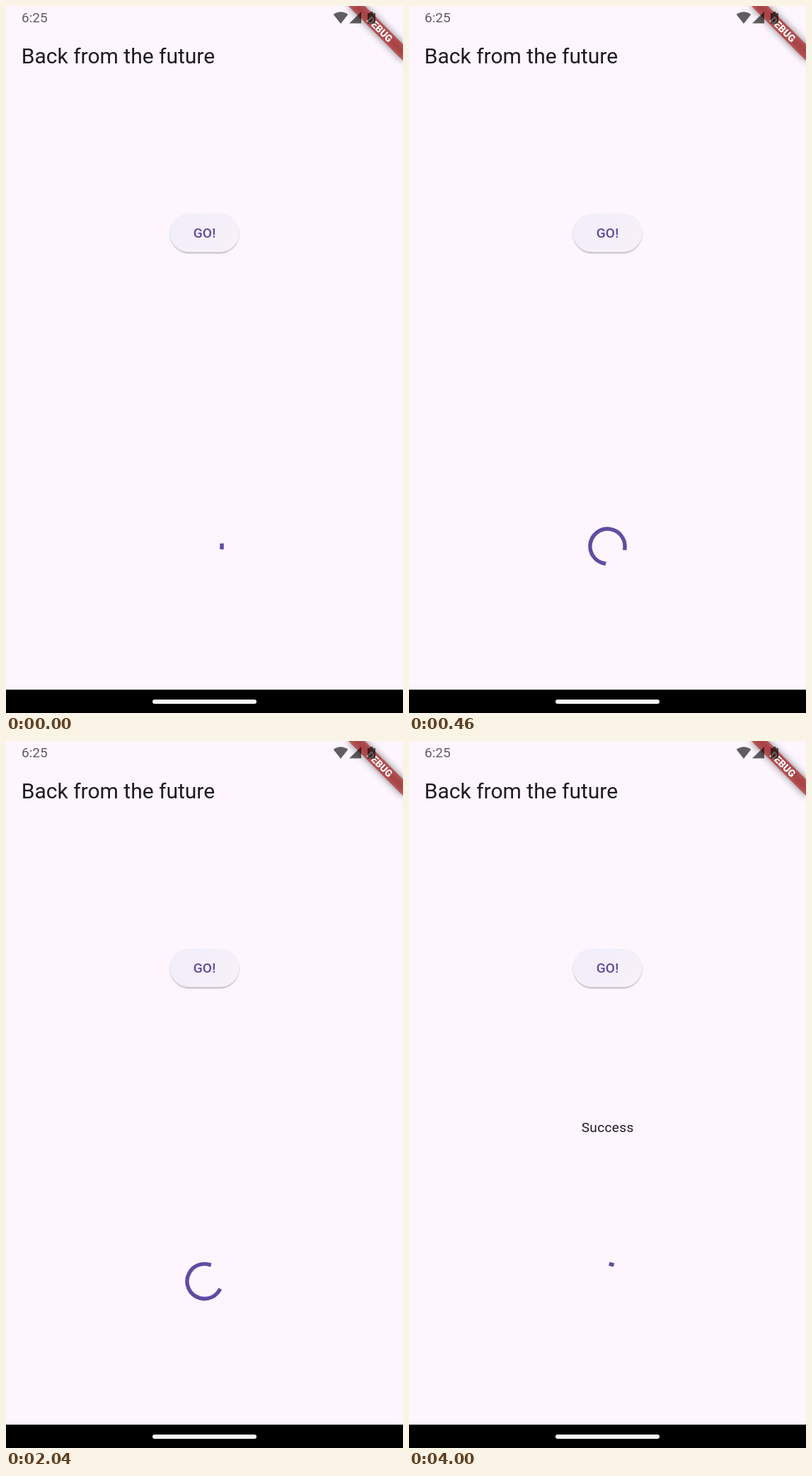
Animation, 561 px wide and 998 px high, one loop 4.04 s. Source, as an HTML page:

```html
<!DOCTYPE html>
<html lang="en">
<head>
<meta charset="utf-8">
<title>Back from the future</title>
<style>
  html, body { margin: 0; width: 100%; height: 100%; overflow: hidden; background: #fdf6fe; }
  svg { display: block; width: 561px; height: 998px; font-family: Roboto, sans-serif; }
  .soft { filter: blur(5.4px); }
  .edge { filter: blur(1px); }
</style>
</head>
<body>
<svg viewBox="0 0 561 998">
  <defs>
    <linearGradient id="face" x2="1" y2="0.4">
      <stop offset="0" stop-color="#f2eff9"/>
      <stop offset="0.4" stop-color="#f2effb"/>
      <stop offset="1" stop-color="#f7f0f7"/>
    </linearGradient>
    <radialGradient id="ripple" cx="0.42" r="0.6">
      <stop offset="0" stop-color="#e6e1fa"/>
      <stop offset="0.55" stop-color="#e8e5f6"/>
      <stop offset="1" stop-color="#ebe8eb"/>
    </radialGradient>
  </defs>

  <rect width="561" height="998" fill="#fdf6fe"/>
  <text x="21.8" y="80.5" font-size="30" fill="#1d1b20">Back from the future</text>

  <!-- Button -->
  <rect class="edge" x="232" y="295" width="97" height="54" rx="27" fill="#000" opacity="0.3"/>
  <rect x="231.5" y="293" width="98" height="54.5" rx="27.2" fill="url(#face)"/>
  <rect id="press" x="231.5" y="293" width="98" height="54.5" rx="27.2" fill="url(#ripple)"/>
  <text x="280.6" y="327" font-size="19.1" font-weight="500" letter-spacing="0.14" text-anchor="middle" fill="#5e4b9f">GO!</text>

  <text id="result" x="280.7" y="552" font-size="19.1" letter-spacing="0.34" text-anchor="middle" fill="#1d1b20">Success</text>
  <circle id="spinner" r="24.55" fill="none" stroke="#614ca2" stroke-width="5.45" stroke-linecap="square"/>

  <!-- Corner banner -->
  <g transform="translate(561 0) rotate(45)">
    <rect class="soft" x="-54.6" y="38.2" width="109.2" height="16.4" fill="#000" opacity="0.5"/>
    <rect x="-54.6" y="38.2" width="109.2" height="16.4" fill="#b71c1c" opacity="0.627"/>
    <text y="51.4" font-size="13.9" font-weight="900" text-anchor="middle" fill="#fff">DEBUG</text>
  </g>

  <!-- Status bar -->
  <g opacity="0.62">
    <text x="22" y="23" font-size="19.1">6:25</text>
    <path d="M473 25 L462.7 12 Q473 4.500 483.300 12 Z"/>
    <path d="M485 24.500 H502 V8 Z"/>
    <path d="M511 10 H514.500 V8 H518.500 V10 H522 V25 H511 Z"/>
  </g>

  <!-- Navigation bar -->
  <rect y="965" width="561" height="33"/>
  <rect x="207" y="979" width="147" height="6" rx="3" fill="#f8f8f8"/>
</svg>
<script>
const LOOP = 4040, FPS = 24;
const PATH = 1333, TURN = 2222;            // spinner periods, ms
const RADIUS = 24.55;
const [press, result, spinner] = ['press', 'result', 'spinner'].map(id => document.getElementById(id));

const clamp = x => Math.min(1, Math.max(0, x));
const ramp = (t, from, to) => clamp((t - from) / (to - from));

// cubic-bezier(0.4, 0, 0.2, 1)
function ease(x) {
  if (x <= 0 || x >= 1) return clamp(x);
  let lo = 0, hi = 1;
  for (let i = 0; i < 24; i++) {
    const s = (lo + hi) / 2, r = 1 - s;
    if (1.2 * r * r * s + 0.6 * r * s * s + s * s * s < x) lo = s; else hi = s;
  }
  return lo * lo * (3 - 2 * lo);
}

function drawSpinner(ms) {
  const phase = ms % PATH / PATH;
  const head = 270 * ease(phase * 2);
  const tail = 270 * ease(phase * 2 - 1);
  const start = -90 + tail + 360 * (ms % TURN) / TURN + 90 * phase;
  const length = Math.max((head - tail) * Math.PI / 180, 0.001) * RADIUS;
  spinner.setAttribute('transform', `translate(280.5 762.7) rotate(${start})`);
  spinner.setAttribute('stroke-dasharray', `${length} 300`);
}

function draw(now) {
  // The picture steps at a fixed frame rate.
  const t = Math.floor(now % LOOP * FPS / 1000 + 0.11) * 1000 / FPS;
  drawSpinner(2732 + t * 0.996);
  press.setAttribute('opacity', ramp(t, 1080, 1250) * (1 - ramp(t, 1450, 1850)));
  result.setAttribute('visibility', t >= 3250 ? 'visible' : 'hidden');
}

function tick() {
  draw(performance.now());
  requestAnimationFrame(tick);
}
tick();
</script>
</body>
</html>
```
